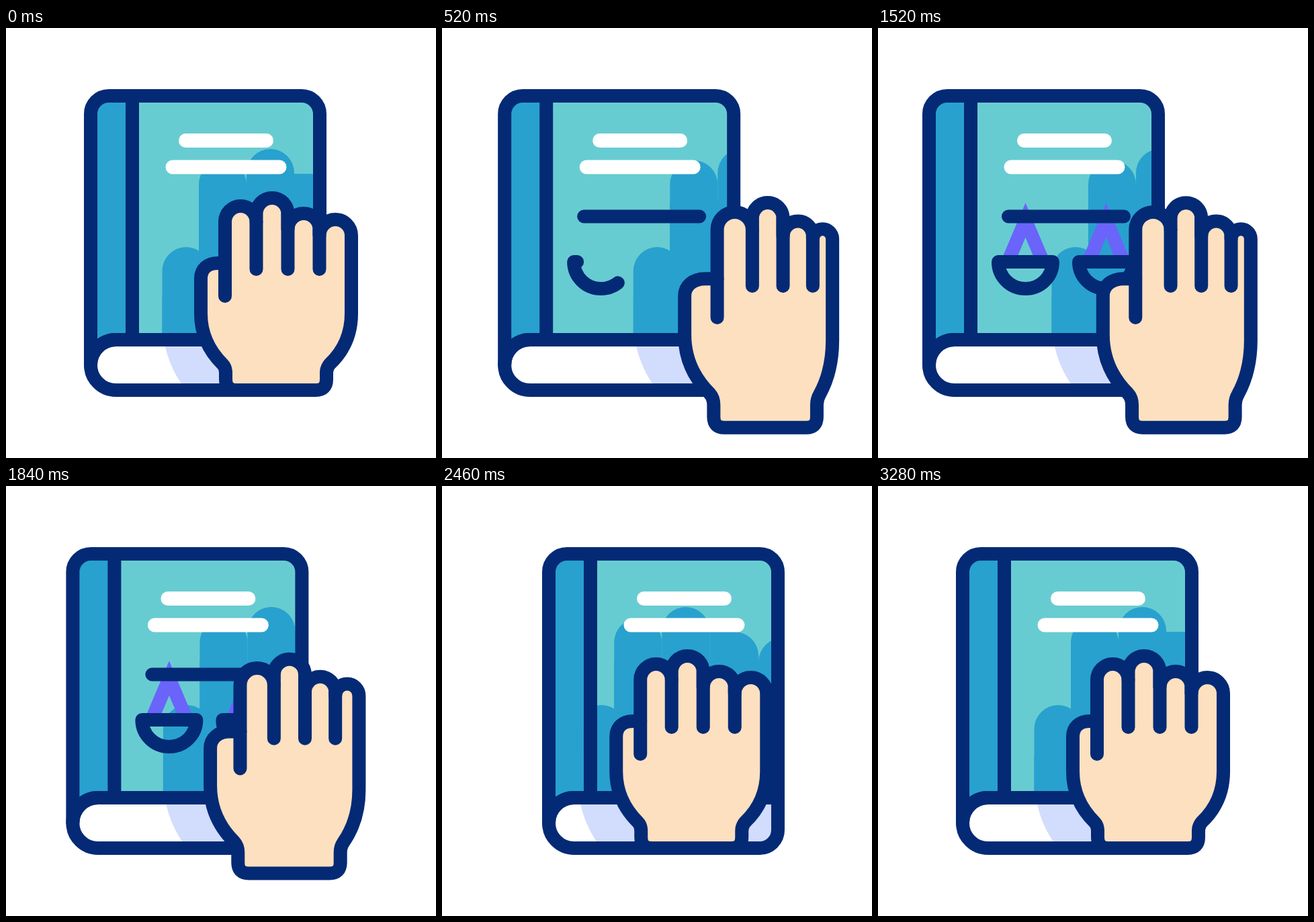
Animation of 640 by 640 pixels, one loop 3.6 s. Source, as an HTML page:

```html
<!DOCTYPE html>
<html lang="en">
<head>
<meta charset="utf-8">
<title>Hand on a law book</title>
<style>
  html, body { margin: 0; width: 100%; height: 100%; overflow: hidden; background: #fff; }
  svg { display: block; width: 100vw; height: 100vh; }
  .line { fill: none; stroke: #042a75; stroke-width: 20; stroke-linecap: round; stroke-linejoin: round; }
  .cord { fill: none; stroke: #6a64fa; stroke-width: 20; }
  .title { stroke: #fff; stroke-width: 21; stroke-linecap: round; }
  .blue { fill: #28a1ce; }
</style>
</head>
<body>
<svg viewBox="0 0 640 640">
  <defs>
    <path id="cover" d="M126 501V128a27 27 0 0 1 27-27H440a27 27 0 0 1 27 27V464H163.500a37.500 37.500 0 0 0-37.500 37.500z"/>
    <path id="pages" d="M467 464H163.500a37.500 37.500 0 0 0 0 75H440a27 27 0 0 0 27-27z"/>
    <clipPath id="inCover"><use href="#cover"/></clipPath>
    <clipPath id="inPages"><use href="#pages"/></clipPath>
  </defs>

  <g id="book">
    <use href="#cover" fill="#67ccd1"/>
    <use href="#pages" fill="#fff"/>
    <g clip-path="url(#inCover)" class="blue">
      <rect x="126" y="101" width="62" height="400"/>
      <g class="shadow">
        <rect x="232.500" y="326" width="71" height="300" rx="35.500"/>
        <rect x="287" y="197" width="71" height="400" rx="35.500"/>
        <rect x="358" y="180" width="71" height="400" rx="35.500"/>
        <path d="M429 217H466a36 36 0 0 1 36 36V500H429z"/>
        <rect x="502" y="226" width="71" height="400" rx="35.500"/>
        <path d="M232.500 400H287V260H573V500H232.500z"/>
      </g>
    </g>
    <g clip-path="url(#inPages)">
      <path class="shadow" fill="#d2dcfd" d="M235 464Q242 506 268 539H640V464z"/>
    </g>
    <path class="title" d="M267.500 167.500H387.500M248 207H407"/>
    <g id="scales">
      <path class="cord" pathLength="1" data-from="640" data-to="920" d="M243.300 348L269.500 286L295.700 348"/>
      <path class="cord" pathLength="1" data-from="1020" data-to="1350" d="M363.300 348L389.500 286L415.700 348"/>
      <path class="line" pathLength="1" data-from="100" data-to="500" d="M244 280.500H416"/>
      <path class="line" pathLength="1" data-from="320" data-to="745" d="M234 348H229A40.500 40 0 0 0 310 348H234"/>
      <path class="line" pathLength="1" data-from="700" data-to="1085" d="M426 348H430A40.500 40 0 0 1 349 348H426"/>
    </g>
    <use href="#cover" class="line"/>
    <use href="#pages" class="line"/>
    <path class="line" d="M188 101V464"/>
  </g>

  <g id="hand">
    <path id="palm" class="line" style="fill:#fde0bf"/>
    <path id="gaps" class="line"/>
  </g>
</svg>
<script>
const LOOP = 3600;
const $ = id => document.getElementById(id);
const shadows = document.querySelectorAll('.shadow');
const strokes = document.querySelectorAll('#scales path');

// Keys are [time, value]
const bookX = [[0, 0], [860, -50], [1630, -50], [2250, 37], [3280, 0]];
const shadowX = [[0, 0], [560, 53], [1000, 46], [1100, 44.8], [1520, 26],
  [1640, 21.4], [1840, 1.5], [2250, -34.5], [3280, 0]];
const handLift = [[0, 0], [520, .89], [1080, 1], [1520, .89], [1640, .845], [1840, .6], [2250, 0]];

const slope = (a, b) => (b[1] - a[1]) / (b[0] - a[0]);

// Zero at turning points, harmonic mean of the neighbouring slopes elsewhere
function tangent(keys, i) {
  if (!i || i === keys.length - 1) return 0;
  const a = slope(keys[i - 1], keys[i]), b = slope(keys[i], keys[i + 1]);
  return a * b > 0 ? 2 * a * b / (a + b) : 0;
}

// Monotone cubic interpolation
function track(keys, t) {
  const i = keys.findIndex(k => k[0] > t) - 1;
  if (i < 0) return keys[keys.length - 1][1];
  const [t0, v0] = keys[i], [t1, v1] = keys[i + 1];
  const d = t1 - t0, s = (t - t0) / d, r = 1 - s;
  return v0 * r * r * (1 + 2 * s) + v1 * s * s * (3 - 2 * s)
    + d * s * r * (r * tangent(keys, i) - s * tangent(keys, i + 1));
}

function ease(t, from, to) {
  const s = Math.min(1, Math.max(0, (t - from) / (to - from)));
  return s * s * (3 - 2 * s);
}

const shift = (el, x) => el.setAttribute('transform', `translate(${x} 0)`);

// Blends the hand between resting (lift 0) and raised (lift 1)
function drawHand(lift) {
  const mix = (a, b) => a + (b - a) * lift;
  const pt = (x0, y0, x1, y1) => `${mix(x0, x1)} ${mix(y0, y1)} `;
  const edges = [mix(326, 344.5), mix(372.5, 397.5), mix(419.5, 443), mix(466.5, 487), 514];
  const tops = [mix(265, 275), mix(253, 261), mix(276, 289), mix(285, 301)];
  const thumbTop = mix(350, 376), base = mix(539, 601.7);
  const left = mix(327, 338.5), right = mix(477, 492.5);
  let palm = `M${edges[0]} ${thumbTop}`, gaps = `M${edges[0]} ${thumbTop}V${mix(399, 435)}`;

  tops.forEach((top, i) => {
    const r = (edges[i + 1] - edges[i]) / 2, y = top + r;
    palm += `V${y}A${r} ${r} 0 0 1 ${edges[i + 1]} ${y}`;
    if (i < 3) gaps += `M${edges[i + 1]} ${y}V${mix(359, 387)}`;
  });

  palm += `V${mix(425, 470)}`
    + 'C' + pt(514, 458, 514, 502) + pt(500, 483, 507, 530) + pt(482, 500, 496.5, 551)
    + `Q${right} ${mix(506, 558)} ${right} ${mix(513, 567)}`
    + `V${base - 16}Q${right} ${base} ${right - 16} ${base}`
    + `H${left + 16}Q${left} ${base} ${left} ${base - 16}`
    + `V${mix(513, 567)}Q${left} ${mix(505, 556)} ` + pt(322, 500, 332, 549)
    + 'C' + pt(305, 483, 309, 526) + pt(290, 458, 294.5, 496) + pt(290, 425, 294.5, 460)
    + `V${mix(373, 402)}C` + pt(290, 359, 294.5, 387) + pt(300, 350, 307, 376) + pt(315, 350, 326, 376)
    + 'Z';
  $('palm').setAttribute('d', palm);
  $('gaps').setAttribute('d', gaps);
}

function render(now) {
  const t = now % LOOP;
  const bx = track(bookX, t), sx = track(shadowX, t), lift = track(handLift, t);
  shift($('book'), bx);
  shadows.forEach(el => shift(el, sx - bx));
  shift($('hand'), sx + 16.7 * lift);
  drawHand(lift);

  strokes.forEach(el => {
    const drawn = t < 2200 ? ease(t, +el.dataset.from, +el.dataset.to) : 0;
    el.style.visibility = drawn > 0 ? 'visible' : 'hidden';
    el.setAttribute('stroke-dasharray', drawn < 1 ? `${drawn} 2` : 'none');
  });
}

const start = performance.now();
(function frame() {
  render(performance.now() - start);
  requestAnimationFrame(frame);
})();
</script>
</body>
</html>
```
